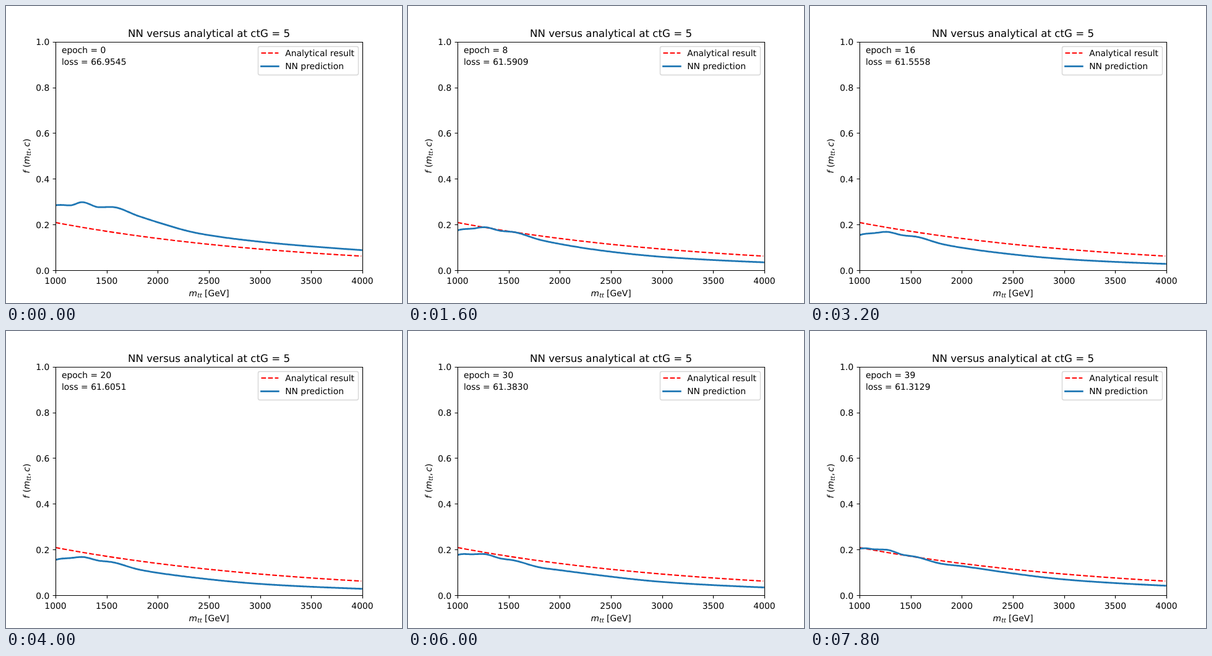
Animation of 640 by 480 pixels, one loop 8000 ms. Source, as an HTML page:

```html
<!DOCTYPE html>
<html lang="en">
<head>
<meta charset="utf-8">
<title>NN versus analytical</title>
<style>
  html, body { margin: 0; width: 100%; height: 100%; overflow: hidden; background: #fff; }
  svg { display: block; width: 640px; height: 480px; }
  text { font: 13.89px "DejaVu Sans", sans-serif; text-rendering: geometricPrecision; white-space: pre; }
  .title { font-size: 16.67px; }
  .mid { text-anchor: middle; }
  .end { text-anchor: end; }
  .it { font-style: oblique; }
  .sub { font-style: oblique; font-size: 9.72px; }
  path { fill: none; }
  .exact { stroke: #f00; stroke-width: 2.08; stroke-dasharray: 7.71 3.33; }
  .nn { stroke: #1f77b4; stroke-width: 2.78; stroke-linecap: square; stroke-linejoin: round; }
  .axis { stroke: #000; stroke-width: 1.11; }
</style>
</head>
<body>
<svg viewBox="0 0 640 480">
  <clipPath id="plot"><rect x="80" y="58" width="496" height="369"/></clipPath>
  <g clip-path="url(#plot)">
    <path id="exact" class="exact"/>
    <path id="nn" class="nn"/>
  </g>
  <path id="axes" class="axis"/>
  <g id="ticks"></g>

  <text class="title mid" x="328" y="50">NN versus analytical at ctG = 5</text>
  <text id="epoch" x="89.9" y="76"></text>
  <text id="loss" x="89.9" y="95"></text>

  <text class="it" x="295.6" y="469">m</text>
  <text class="sub" x="309.2" y="471">tt</text>
  <text x="321" y="469">[GeV]</text>

  <g transform="translate(38 270.4) rotate(-90)">
    <text class="it">f</text>
    <text x="9.3">(</text>
    <text class="it" x="14.7">m</text>
    <text class="sub" x="28.3" y="2">tt</text>
    <text x="36.4">,</text>
    <text class="it" x="43">c</text>
    <text x="50.7">)</text>
  </g>

  <rect x="407.5" y="65.5" width="162" height="46" rx="2.8" fill="#fff" fill-opacity=".8" stroke="#ccc" stroke-opacity=".8" stroke-width="1.39"/>
  <path class="exact" d="M412.5 76H440.3"/>
  <path class="nn" d="M412.5 97.5H440.3"/>
  <text x="451.2" y="81">Analytical result</text>
  <text x="451.2" y="102">NN prediction</text>
</svg>
<script>
const STEP = 200, EPOCHS = 40, TROUGH = 12;
const el = id => document.getElementById(id);
const plotX = mass => 80 + (mass - 1000) * 496 / 3000;
const plotY = value => 427.2 - 369.6 * value;

// Smooth curve through (xs, ys), monotone wherever the data are.
function spline(xs, ys) {
  const n = xs.length - 1;
  const h = i => xs[i + 1] - xs[i];
  const m = i => (ys[i + 1] - ys[i]) / h(i);
  const slopes = xs.map((_, i) => {
    if (i === 0) return m(0);
    if (i === n) return m(n - 1);
    const a = m(i - 1), b = m(i);
    return a * b > 0 ? 2 * a * b / (a + b) : 0;
  });
  return x => {
    let i = 0;
    while (i < n - 1 && x > xs[i + 1]) i++;
    const t = (x - xs[i]) / h(i), u = 1 - t;
    return ys[i] * (1 + 2 * t) * u * u + ys[i + 1] * t * t * (3 - 2 * t)
         + h(i) * t * u * (slopes[i] * u - slopes[i + 1] * t);
  };
}

function trace(f) {
  let d = "M";
  for (let mass = 1000; mass < 4000; mass += 10)
    d += `${plotX(mass).toFixed(2)} ${plotY(f(mass)).toFixed(2)} `;
  return d;
}

const analytical = mass => .209 * Math.exp(-1.215 * (mass - 1000) / 3000);

// The learned curve when untrained, at its lowest, and at the end.
const masses = [1000, 1050, 1140, 1260, 1430, 1545, 1820, 2000, 2400, 3000, 4000];
const logShape = values => spline(masses, values.map(Math.log));
const first  = logShape([.285, .286, .284, .298, .276, .277, .236, .210, .1615, .125, .0882]);
const lowest = logShape([.160, .165, .168, .1735, .158, .153, .1185, .1034, .0777, .0514, .0295]);
const last   = logShape([.204, .206, .2015, .1995, .177, .169, .1366, .1277, .102, .0695, .0419]);

function prediction(epoch) {
  const fall = Math.max(0, 1 - epoch / TROUGH) ** 1.7;
  const t = Math.max(0, (epoch - TROUGH) / (EPOCHS - 1 - TROUGH));
  const rise = t * (-1.6 + 5 * t - 2.4 * t * t);
  const sag = .053 * Math.sin(Math.PI * t);
  return mass => {
    const low = lowest(mass);
    return Math.exp(low + fall * (first(mass) - low) + rise * (last(mass) - low)
      - sag * Math.exp(-(((mass - 1690) / 510) ** 2)));
  };
}

const loss = spline([0, 4, 12, 20, 24, 30, 39],
  [66.9545, 61.8341, 61.5065, 61.6051, 61.5255, 61.383, 61.3129]);

function drawAxes() {
  let lines = "M80.5 58.5H576.5V427.5H80.5Z", labels = "";
  for (let mass = 1000; mass <= 4000; mass += 500) {
    const x = plotX(mass);
    lines += `M${Math.round(x) + .5} 427.5v4.86`;
    labels += `<text class="mid" x="${x}" y="449">${mass}</text>`;
  }
  for (let i = 0; i <= 5; i++) {
    const y = plotY(i / 5);
    lines += `M80.5 ${Math.round(y) + .5}h-4.86`;
    labels += `<text class="end" x="70.3" y="${Math.round(y + 5.9)}">${(i / 5).toFixed(1)}</text>`;
  }
  el("axes").setAttribute("d", lines);
  el("ticks").innerHTML = labels;
  el("exact").setAttribute("d", trace(analytical));
}

let shown = -1;
function show(epoch) {
  if (epoch === shown) return;
  shown = epoch;
  el("nn").setAttribute("d", trace(prediction(epoch)));
  el("epoch").textContent = `epoch = ${epoch}`;
  el("loss").textContent = `loss = ${loss(epoch).toFixed(4)}`;
}

const start = performance.now();
function tick() {
  show(Math.floor((performance.now() - start) / STEP) % EPOCHS);
  requestAnimationFrame(tick);
}
drawAxes();
tick();
</script>
</body>
</html>
```
